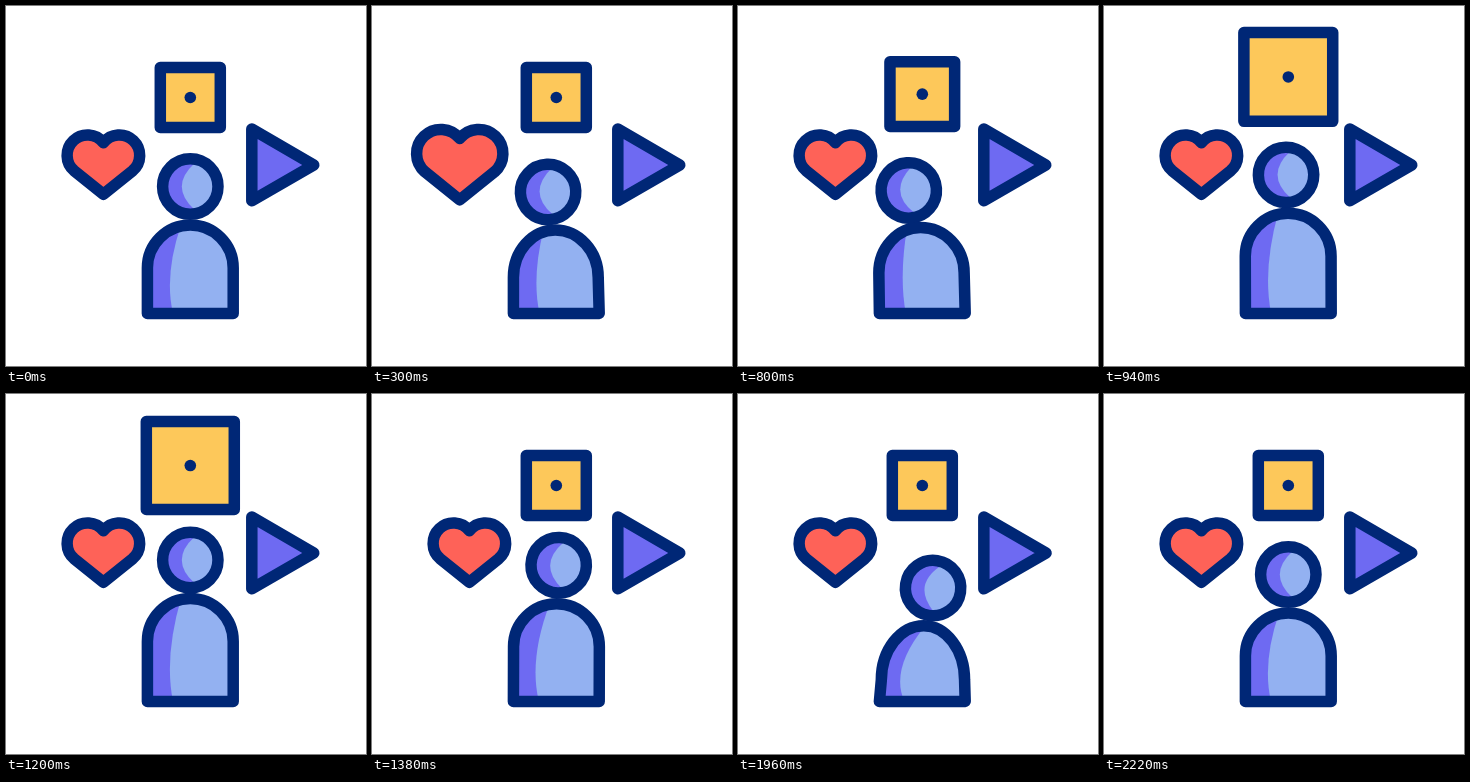
Recreate the animation shown at these times as an HTML page with a canvas. Size 360 px wide and 360 px high, loop 2.4 s.

```html
<!DOCTYPE html>
<html lang="en">
<head>
<meta charset="utf-8">
<title>Person choosing shapes</title>
<style>
html, body { margin: 0; width: 100%; height: 100%; overflow: hidden; background: #fff; }
canvas { display: block; width: 360px; height: 360px; }
</style>
</head>
<body>
<canvas id="stage" width="360" height="360"></canvas>
<script>
const LOOP = 2400;
const NAVY = '#002776', PURPLE = '#6e6af2', BLUE = '#93b1f1';
const RED = '#fe6258', YELLOW = '#fdc85a';
const ctx = document.getElementById('stage').getContext('2d');

const MID = 184.3, TOP = 219, FLOOR = 307.4, HALF = 42.9;
const HEART = new Path2D(
  'M0 29.6 L-29.3 6 A20.35 20.35 0 1 1 0 -22 A20.35 20.35 0 1 1 29.3 6 Z');
const HEAD_LIGHT = new Path2D('M4 -23 Q-21 0 4 23 H40 V-23 Z');

// lean: head offset in x, drop: how far the body sinks, turn: head angle
const REST = { lean: 0, drop: 0, turn: 0 };
const LEFT = { lean: -22.2, drop: 13.5, turn: -0.12 };
const UP = { lean: 0, drop: -14.5, turn: 0 };
const RIGHT = { lean: 14, drop: 16.5, turn: 0.2 };
const MOVES = [
  { from: 202, to: 440, pose: LEFT },
  { from: 636, to: 1020, pose: UP },
  { from: 1278, to: 1660, pose: RIGHT },
  { from: 1840, to: 2220, pose: REST }
];

const lerp = (a, b, k) => a + (b - a) * k;
const progress = (t, from, to) => Math.min(1, Math.max(0, (t - from) / (to - from)));
const sine = x => (1 - Math.cos(Math.PI * x)) / 2;

// cubic-bezier(.33, 0, .2, 1)
function settle(x) {
  let lo = 0, hi = 1;
  for (let i = 0; i < 24; i++) {
    const s = (lo + hi) / 2, r = 1 - s;
    if (r * r * s + 0.6 * r * s * s + s * s * s < x) lo = s;
    else hi = s;
  }
  return lo * lo * (3 - 2 * lo);
}

const pulse = (t, growFrom, growTo, shrinkFrom, shrinkTo) =>
  settle(progress(t, growFrom, growTo)) - settle(progress(t, shrinkFrom, shrinkTo));

function poseAt(t) {
  const now = { ...REST };
  for (const { from, to, pose } of MOVES) {
    const k = sine(progress(t, from, to));
    for (const key in now) now[key] = lerp(now[key], pose[key], k);
  }
  return now;
}

function paint(path, fill) {
  ctx.fillStyle = fill;
  ctx.fill(path);
  ctx.stroke(path);
}

// Purple base, blue light clipped inside, outline on top
function shaded(path, light) {
  ctx.fillStyle = PURPLE;
  ctx.fill(path);
  ctx.save();
  ctx.clip(path);
  ctx.fillStyle = BLUE;
  ctx.fill(light);
  ctx.restore();
  ctx.stroke(path);
}

function disc(x, y, r) {
  const p = new Path2D();
  p.arc(x, y, r, 0, Math.PI * 2);
  return p;
}

function head({ lean, drop, turn }) {
  ctx.save();
  ctx.translate(MID + lean, 180.5 + drop + lean * lean * 0.0075);
  ctx.rotate(turn);
  shaded(disc(0, 0, 27.7), HEAD_LIGHT);
  ctx.restore();
}

function body({ lean, drop, turn }) {
  const squash = Math.max(0, drop);
  const x = MID + lean * 0.13, y = TOP + drop;
  const bend = HALF + squash * 0.9, shoulder = y + bend;
  const shell = new Path2D();
  const wall = side => MID + side * (HALF - squash * 0.1) + lean * 0.06;
  const l = wall(-1), r = wall(1), c = 0.552;
  shell.moveTo(MID - HALF, FLOOR);
  shell.lineTo(l, shoulder);
  shell.bezierCurveTo(l, shoulder - bend * c, lerp(x, l, c), y, x, y);
  shell.bezierCurveTo(lerp(x, r, c), y, r, shoulder - bend * c, r, shoulder);
  shell.lineTo(MID + HALF, FLOOR);
  shell.closePath();

  const light = new Path2D();
  light.moveTo(175 + turn * 80, y);
  light.quadraticCurveTo(158 - turn * 40, lerp(y, FLOOR, 0.57), 167 - lean * 0.06, FLOOR);
  light.lineTo(240, FLOOR);
  light.lineTo(240, y);
  light.closePath();
  shaded(shell, light);
}

function heart(k) {
  const s = lerp(1, 1.36, k), p = new Path2D();
  p.addPath(HEART, { a: s, d: s, e: lerp(97.4, 79, k), f: 158.7 });
  paint(p, RED);
}

function square(k) {
  const h = lerp(30, 45.3, k), y = lerp(91.5, 69.7, k), box = new Path2D();
  box.rect(MID - h, y - h, h * 2, h * 2);
  paint(box, YELLOW);
  ctx.fillStyle = NAVY;
  ctx.fill(disc(MID, y, 5.8));
}

function triangle(k) {
  const x = lerp(245.8, 249.3, k), h = lerp(35.8, 48.4, k), y = 158.9, p = new Path2D();
  p.moveTo(x, y - h);
  p.lineTo(x + h * 1.73, y);
  p.lineTo(x, y + h);
  p.closePath();
  paint(p, PURPLE);
}

function draw(t) {
  ctx.fillStyle = '#fff';
  ctx.fillRect(0, 0, 360, 360);
  ctx.strokeStyle = NAVY;
  ctx.lineWidth = 11.5;
  ctx.lineJoin = 'round';
  const pose = poseAt(t);
  head(pose);
  body(pose);
  heart(pulse(t, 213, 475, 597, 765));
  square(pulse(t, 752, 1020, 1172, 1375));
  triangle(pulse(t, 1395, 1655, 1790, 1990));
}

const start = performance.now();
function tick() {
  draw((performance.now() - start) % LOOP);
  requestAnimationFrame(tick);
}
tick();
</script>
</body>
</html>
```
